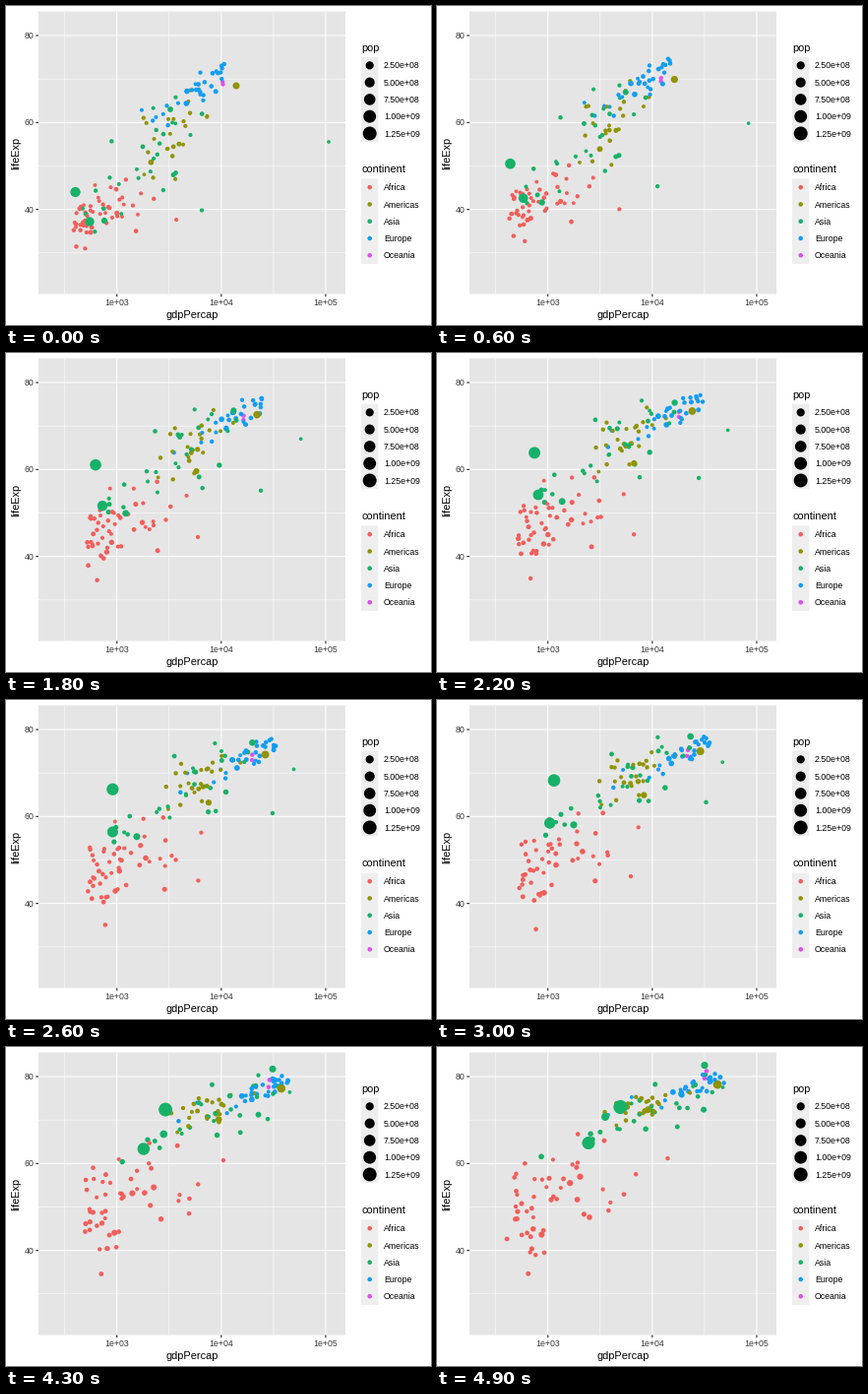
A matplotlib script that plays this animation: 432 by 324 pixels, repeating every 5000 ms.

```python
import numpy as np
import matplotlib.pyplot as plt
from matplotlib.animation import FuncAnimation
from matplotlib.patches import Rectangle

W, H, FRAMES = 432, 324, 50
LEFT, RIGHT, TOP, BOTTOM = 33, 345, 5.5, 292.5

# path: start, pull and end of the group's centre; spread: x and y, from start to end
# tie: how far wealth decides life span; skew: tail to the rich (+) or poor (-) side
CONTINENTS = {
    "Africa": dict(color="#F35E5A", count=52, path=[(105, 208), (138, 151), (128, 150)],
                   spread=[(28, 18), (41, 37)], tie=0.5, skew=0.25, pop=4, growth=3.5),
    "Americas": dict(color="#909405", count=23, path=[(166, 140), (197, 75), (205, 62)],
                     spread=[(21, 29), (24, 12)], tie=0.6, skew=0, pop=4, growth=2.2),
    "Asia": dict(color="#17B169", count=27, path=[(135, 160), (177, 77), (205, 65)],
                 spread=[(34, 37), (48, 23)], tie=0.75, skew=0, pop=7, growth=2.7),
    "Europe": dict(color="#129DF5", count=30, path=[(190, 87), (256, 58), (255, 42)],
                   spread=[(23, 17), (26, 11)], tie=0.85, skew=-0.2, pop=9, growth=1.2),
    "Oceania": dict(color="#E04FEF", count=2, path=[(220, 78), (249, 66), (269, 27)],
                    spread=[(1, 1), (7, 3)], tie=0.5, skew=0, pop=4, growth=2),
}

# Landmark dots: continent, population in millions, then start, pull and end
LANDMARKS = [
    ("Asia", 520, [(70.5, 189), (81, 64), (186.5, 61)]),
    ("Asia", 390, [(85, 219), (93, 117), (154, 97.5)]),
    ("Asia", 82, [(100, 218), (126, 142), (171, 71)]),
    ("Asia", 60, [(167, 105), (275, 30), (272, 18.6)]),
    ("Asia", 5, [(199, 207.5), (312, 104), (254.6, 62)]),
    ("Asia", 0.2, [(328, 138), (278, 57), (290.5, 41)]),
    ("Americas", 145, [(234, 81), (264.6, 54), (285, 38)]),
    ("Americas", 57, [(147.4, 158.7), (227, 103), (214.5, 63.7)]),
]

rng = np.random.default_rng(52)
progress = np.linspace(0, 1, FRAMES)
surveys = np.linspace(0, 1, 12)  # five years apart


def diameter(millions):
    return 3.55 + 10.67 * np.sqrt(np.minimum(millions, 1319) / 1319)


def bend(path):
    """Quadratic curve through time, as rows of x and y."""
    start, pull, end = np.array(path)[:, :, None]
    t = progress
    return (1 - t) ** 2 * start + 2 * t * (1 - t) * pull + t ** 2 * end


def growing(pop, continent):
    return diameter(pop * CONTINENTS[continent]["growth"] ** progress)


def landmark(continent, pop, path):
    return [*bend(path), growing(pop, continent)]


def wobble(size):
    return np.interp(progress, surveys, rng.normal(0, size, surveys.size))


def drifting(stretch):
    """A standard score that slowly turns into another one."""
    start, end = np.clip(rng.normal(size=2), -1.9, 1.9)
    return start * np.cos(stretch * progress) + end * np.sin(stretch * progress)


def crowd_member(continent):
    group = CONTINENTS[continent]
    x, y = bend(group["path"])
    start, end = np.array(group["spread"])[:, :, None]
    spread_x, spread_y = start + (end - start) * progress
    wealth, luck = drifting(0.6), drifting(0.8)
    life = group["tie"] * wealth + np.sqrt(1 - group["tie"] ** 2) * luck
    wealth = wealth + group["skew"] * (wealth ** 2 - 1)
    x = x + spread_x * (wealth + wobble(0.08))
    y = y - spread_y * (life + wobble(0.08))
    pop = min(group["pop"] * rng.lognormal(0, 0.9), 50)
    return [np.clip(x, 56, 293), np.clip(y, 20, 262), growing(pop, continent)]


def build_dots():
    members = [name for name, group in CONTINENTS.items() for _ in range(group["count"])]
    names = members + [row[0] for row in LANDMARKS]
    dots = [crowd_member(name) for name in members] + [landmark(*row) for row in LANDMARKS]
    order = rng.permutation(len(dots))
    colors = np.array([CONTINENTS[name]["color"] for name in names])
    return np.array(dots)[order], colors[order]


plt.rcParams["font.family"] = "Liberation Sans"
fig = plt.figure(figsize=(W / 72, H / 72), dpi=72, facecolor="white")
ax = fig.add_axes([0, 0, 1, 1])
ax.set_xlim(0, W)
ax.set_ylim(H, 0)
ax.axis("off")


def rect(x, y, w, h, color):
    ax.add_patch(Rectangle((x, y), w, h, facecolor=color, linewidth=0, zorder=0,
                           snap=False))


def line(xs, ys, color, width):
    ax.plot(xs, ys, color=color, lw=width, zorder=1, solid_capstyle="butt", snap=False)


def label(x, y, text, size=8.8, color="black", **kw):
    ax.text(x, y, text, fontsize=size, color=color, va="baseline",
            rotation_mode="anchor", **kw)


def x_of(exponent):
    return LEFT + (exponent - 2.2484) * 106.1


def y_of(years):
    return TOP + (85.55 - years) * 4.416


def draw_panel():
    rect(LEFT, TOP, RIGHT - LEFT, BOTTOM - TOP, "#E5E5E5")
    for exponent in (2.5, 3.5, 4.5):
        line([x_of(exponent)] * 2, [TOP, BOTTOM], "white", 0.53)
    for years in (30, 50, 70):
        line([LEFT, RIGHT], [y_of(years)] * 2, "white", 0.53)
    for exponent in (3, 4, 5):
        x = x_of(exponent)
        line([x, x], [TOP, BOTTOM], "white", 1.07)
        line([x, x], [BOTTOM, BOTTOM + 2.75], "#1F1F1F", 1.07)
        label(x, 304, f"1e+0{exponent}", color="#363636", ha="center")
    for years in (40, 60, 80):
        y = y_of(years)
        line([LEFT, RIGHT], [y, y], "white", 1.07)
        line([LEFT - 2.75, LEFT], [y, y], "#1F1F1F", 1.07)
        label(28.2, y + 3.15, str(years), color="#363636", ha="right")
    label((LEFT + RIGHT) / 2, 317, "gdpPercap", 11, ha="center")
    label(13.4, (TOP + BOTTOM) / 2, "lifeExp", 11, ha="center", rotation=90)


def draw_legend(title, baseline, top, texts, sizes, colors):
    label(361, baseline, title, 11)
    rect(361, top, 17.28, 17.28 * len(texts), "#EEEEEE")
    ys = top + 17.28 * (np.arange(len(texts)) + 0.5)
    ax.scatter(np.full(len(texts), 369.7), ys, s=np.square(sizes), c=colors,
               linewidths=0, zorder=3, snap=False)
    for text, y in zip(texts, ys):
        label(384, y + 3.15, text)


draw_panel()
pops = np.arange(250, 1251, 250)
draw_legend("pop", 46, 51.7, [f"{p * 1e6:.2e}" for p in pops], diameter(pops),
            ["black"] * len(pops))
draw_legend("continent", 168.7, 175.5, list(CONTINENTS), np.full(len(CONTINENTS), 4.6),
            [group["color"] for group in CONTINENTS.values()])

dots, dot_colors = build_dots()
cloud = ax.scatter(dots[:, 0, 0], dots[:, 1, 0], s=dots[:, 2, 0] ** 2,
                   c=dot_colors, linewidths=0, zorder=4, snap=False)


def update(frame):
    cloud.set_offsets(dots[:, :2, frame])
    cloud.set_sizes(dots[:, 2, frame] ** 2)
    return (cloud,)


anim = FuncAnimation(fig, update, frames=FRAMES, interval=100, repeat=True,
                     repeat_delay=0, blit=False)
plt.show()
```
